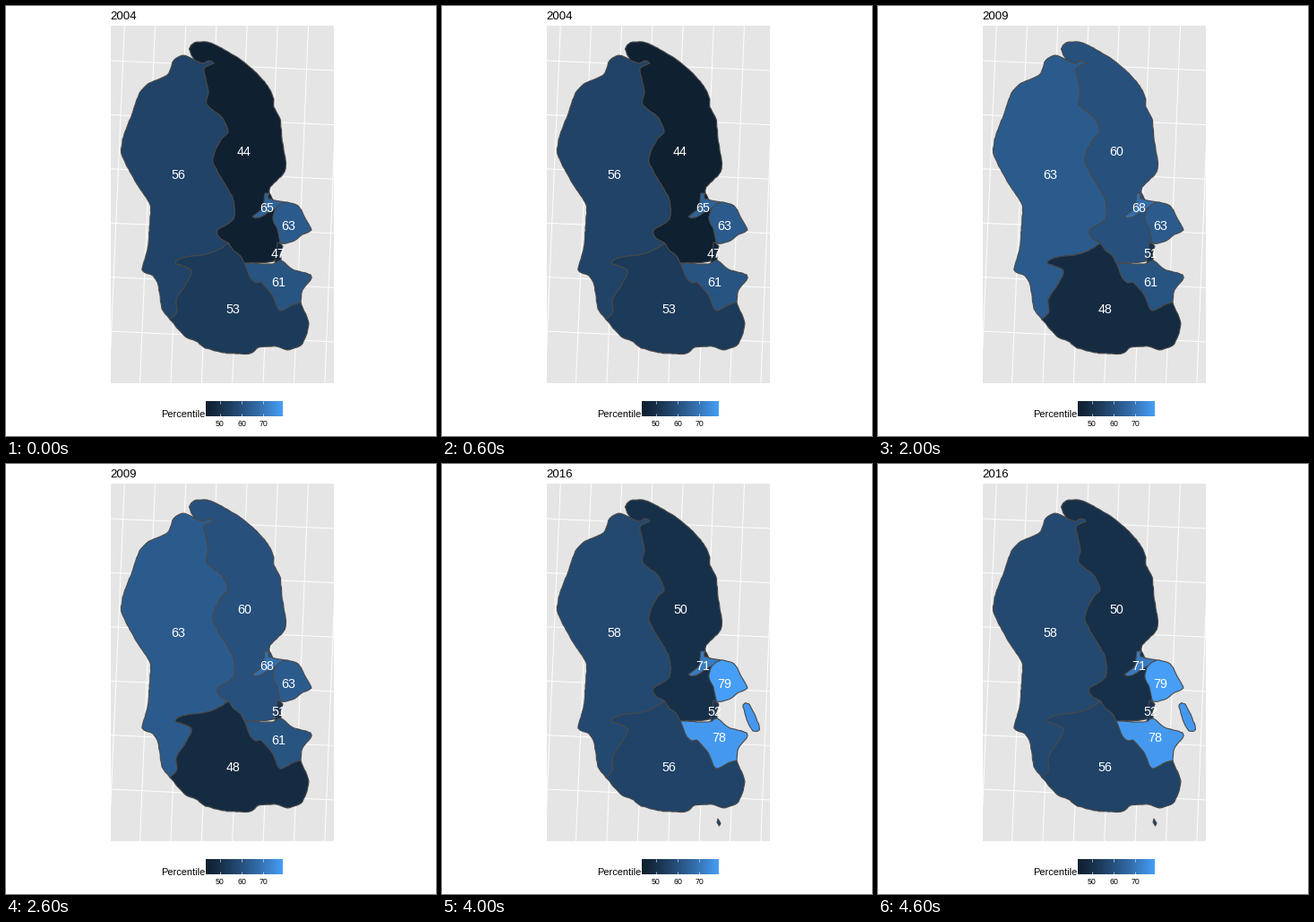
These frames come from a looping animation (480 px wide and 480 px high, 5 s). A matplotlib script:

```python
import numpy as np
import matplotlib.pyplot as plt
from matplotlib.animation import FuncAnimation
from matplotlib.colors import ListedColormap, Normalize
from matplotlib.patches import Polygon, Rectangle

plt.rcParams["font.family"] = "Liberation Sans"
SIZE = 480
DPI = 72  # one point equals one pixel

YEARS = [2004, 2006, 2009, 2012, 2016]
VALUES = {
    "west": [56, 61, 63, 66, 58],
    "south": [53, 54, 48, 50, 56],
    "north": [44, 59, 60, 64, 50],
    "inlet": [65, 71, 68, 78, 71],
    "strip": [47, 51, 51, 52, 52],
    "cape": [63, 65, 63, 76, 79],
    "bay": [61, 61, 61, 67, 78],
}
LABELS = {
    "west": (192, 188), "south": (253, 338), "north": (266, 162),
    "inlet": (291.5, 225), "strip": (304, 276), "cape": (315.5, 245),
    "bay": (304.5, 308),
}

# Blue ramp: each channel sags a little below a straight blend.
t = np.linspace(0, 1, 256)[:, None]
dark, light = np.array([[14, 31, 47], [70, 158, 246]]) / 255
sag = np.array([.1, .31, .31])
cmap = ListedColormap(dark + (light - dark) * (t - sag * t * (1 - t)))
norm = Normalize(43.4, 79)

rng = np.random.default_rng(4)


def coast(*keys, closed=False, step=3, jitter=.35):
    """Smooth curve through key points, with slightly ragged samples."""
    p = np.array(keys, float)
    if closed:
        p = np.vstack([p[-1], p, p[:2]])
    else:
        p = np.vstack([p[0], p, p[-1]])
    out = []
    for a, b, c, d in zip(p, p[1:], p[2:], p[3:]):
        n = max(1, int(np.hypot(*(c - b)) / step))
        u = np.arange(n)[:, None] / n
        m0, m1 = .35 * (c - a), .35 * (d - b)
        seg = (b * (1 - u) ** 2 * (1 + 2 * u) + c * u ** 2 * (3 - 2 * u)
               + m0 * u * (1 - u) ** 2 - m1 * u ** 2 * (1 - u))
        seg[1:] += rng.uniform(-jitter, jitter, seg[1:].shape)
        out.append(seg)
    return np.vstack(out + [p[-2:-1]])


# Junctions where three borders or coasts meet
TOP, MID, LOW = (210, 60), (249, 265), (183, 350)
FORK, EAST = (266, 287), (329, 331)

west_coast = coast(
    LOW, (174, 338), (170, 312), (164, 301), (152, 295), (158, 272),
    (160, 248), (161, 222), (147, 200), (134, 177), (128.5, 162),
    (132, 143), (142, 117), (149, 97), (160, 86), (180, 77), (187, 61),
    (197, 55), TOP)
north_coast = coast(
    TOP, (204.5, 48), (210, 41), (224, 40), (241, 47), (262, 60), (280, 75),
    (292, 89), (299, 104), (299, 113), (306, 126), (308, 148), (312.5, 177),
    (309, 188), (295, 202), (294, 209))
south_coast = coast(
    EAST, (333, 341), (338, 354), (335, 368), (329, 379), (314, 384),
    (302, 380), (282, 381), (272, 388), (242, 387), (221, 381), (214, 375),
    (200, 369), (189, 357), LOW)
west_north = coast(
    TOP, (220, 64), (226, 61), (232, 64), (221, 70), (226, 95), (224, 110),
    (241, 124), (248, 141), (240, 149), (231, 174), (253, 214), (254, 238),
    (236, 250), (238, 258), MID)
west_south = coast(
    MID, (228, 276), (197, 281), (189, 287), (207, 295), (202, 309),
    (190, 328), (191, 341), LOW)
north_south = coast(MID, (254, 273), (261, 278), FORK)
south_bay = coast(
    FORK, (273, 304), (279, 309), (284, 308), (297, 322), (306, 340),
    (321, 333), EAST)
bay_coast = coast(
    EAST, (331, 317), (340, 306), (340, 300), (320, 294), (307, 284),
    (297, 288), FORK)
north_inner = coast((294, 209), (300, 222), (304, 247), (304, 283), FORK)

# Painted in this order: small regions cover the hidden edge of the north.
SHAPES = {
    "west": np.vstack([west_coast, west_north, west_south]),
    "south": np.vstack([north_south, south_bay, south_coast,
                        west_south[::-1]]),
    "north": np.vstack([north_coast, north_inner, north_south[::-1],
                        west_north[::-1]]),
    "inlet": coast(
        (289, 209), (294, 209), (293, 215), (311, 219), (310, 223),
        (300, 226), (283, 236), (275, 235), (287, 225), closed=True),
    "strip": coast(
        (303, 264), (309, 268), (306, 277), (307, 284), (300, 287),
        (302, 275), closed=True),
    "cape": coast(
        (311, 219), (326, 223), (334, 237), (341, 250), (331, 255),
        (322, 262), (307, 265), (303, 249), (298, 238), (301, 226),
        closed=True),
    "bay": np.vstack([south_bay, bay_coast]),
}
ISLE = coast((336, 269), (343, 268), (354, 292), (353, 298), (347, 298),
             (340, 285), closed=True)
ISLET = [(308, 396), (311, 401), (309.5, 404), (307, 400)]

fig = plt.figure(figsize=(SIZE / DPI, SIZE / DPI), dpi=DPI, facecolor="white")
ax = fig.add_axes([0, 0, 1, 1])
ax.axis("off")

panel = Rectangle((117, 22), 249, 399, fc="#e5e5e5", ec="none")
ax.add_patch(panel)


def grid_line(x, y):
    line, = ax.plot(x, y, color="white", lw=1)
    line.set_clip_path(panel)


for k in range(6):
    grid_line((117, 366), (61 + 60.4 * k, 72 + 60.6 * k))
for k in range(-1, 7):
    grid_line((166.5 + 34.2 * k, 149.5 + 34.4 * k), (22, 421))


def add_shape(points):
    return ax.add_patch(Polygon(points, closed=True, ec="#484848", lw=1.1,
                                joinstyle="round", zorder=3))


def add_text(x, y, size, s="", color="black", ha="center"):
    return ax.text(x, y, s, fontsize=size, color=color, ha=ha,
                   va="baseline", zorder=5)


regions = {name: add_shape(pts) for name, pts in SHAPES.items()}
isle, islet = add_shape(ISLE), add_shape(ISLET)
numbers = {name: add_text(x, y + 5, 14.2, color="white")
           for name, (x, y) in LABELS.items()}
title = add_text(116.3, 15, 13.2, ha="left")

# Legend
X0, X1, Y0, Y1 = 223, 309, 441, 458
ax.imshow(t.T, cmap=cmap, aspect="auto", extent=(X0, X1, Y1, Y0), zorder=2)
add_text(173, 459, 11, "Percentile", ha="left")
for v in (50, 60, 70):
    x = X0 + (X1 - X0) * norm(v)
    for y in (Y0, Y1 - 3.4):
        ax.plot((x, x), (y, y + 3.4), color="white", lw=.6,
                solid_capstyle="butt", zorder=4)
    add_text(x, 469, 8.8, str(v))

ax.set_xlim(0, SIZE)
ax.set_ylim(SIZE, 0)


def update(i):
    title.set_text(str(YEARS[i]))
    for name, values in VALUES.items():
        regions[name].set_facecolor(cmap(norm(values[i])))
        numbers[name].set_text(str(values[i]))

    # The islands join in the last year and pull the bay's label seaward.
    joined = YEARS[i] == YEARS[-1]
    x, y = LABELS["bay"]
    numbers["bay"].set_position((x + 5 * joined, y + 5 - 3 * joined))
    for patch, name in ((isle, "bay"), (islet, "south")):
        patch.set_visible(joined)
        patch.set_facecolor(cmap(norm(VALUES[name][i])))
    return [title, isle, islet, *regions.values(), *numbers.values()]


anim = FuncAnimation(fig, update, frames=len(YEARS), interval=1000,
                     repeat=True, repeat_delay=0, blit=False)
plt.show()
```
